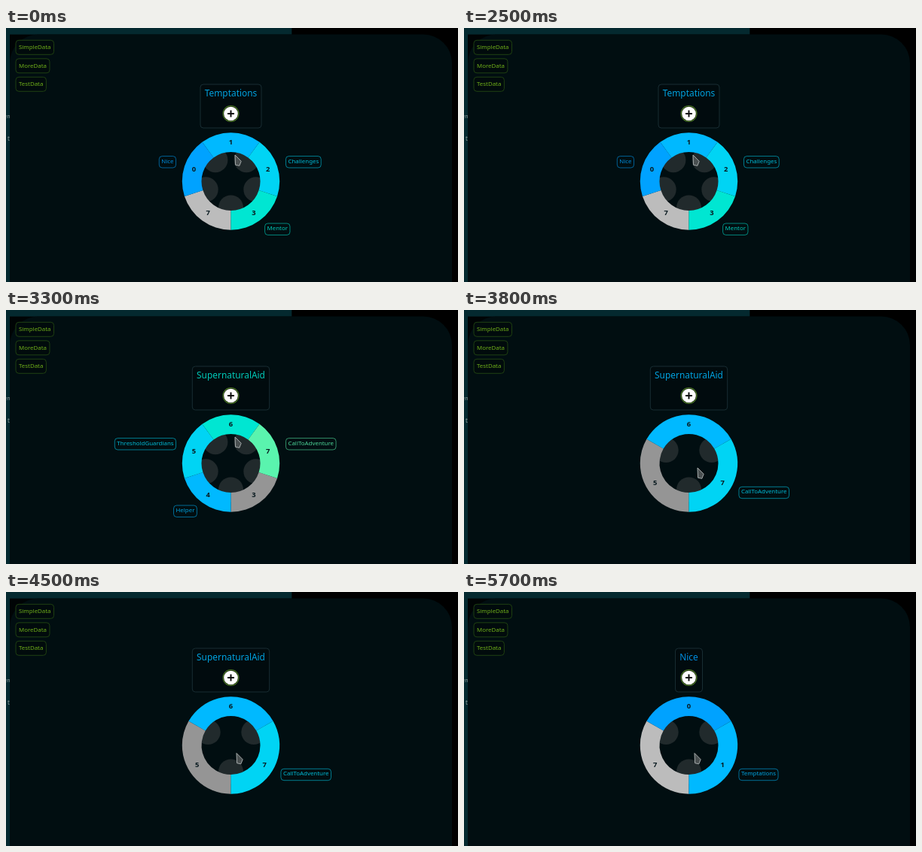
Animation, 600 px wide and 338 px high, one loop 5.8 s. Source, as an HTML page with a canvas:

```html
<!DOCTYPE html>
<html lang="en">
<head>
<meta charset="utf-8">
<title>Ring menu</title>
<style>
html, body { margin: 0; width: 100%; height: 100%; overflow: hidden; background: #000; }
canvas { display: block; }
</style>
</head>
<body>
<canvas id="stage" width="600" height="338"></canvas>
<script>
const ctx = document.getElementById('stage').getContext('2d');
const LOOP = 5800, CX = 298.5, CY = 204, OUTER = 64.7, INNER = 39;
const FONT = '"Noto Sans", "Open Sans", sans-serif';
const items = ['Nice', 'Temptations', 'Challenges', 'Mentor', 'Helper',
  'ThresholdGuardians', 'SupernaturalAid', 'CallToAdventure'];
const palette = ['#00a2ff', '#00b9ff', '#00d4f4', '#00e6d2', '#5af4ae', '#aefb86'];

// [start ms, selected item, slot count, cursor x, cursor y]
const timeline = [
  [0, 1, 5, 304, 169],
  [2800, 0, 5, 304, 169],
  [3000, 7, 5, 304, 169],
  [3200, 6, 5, 304, 169],
  [3800, 6, 3, 310, 210],
  [3900, 6, 4, 308.5, 213],
  [4000, 6, 6, 307, 215.5],
  [4200, 6, 5, 307, 215.5],
  [4300, 6, 4, 306.5, 215],
  [4400, 6, 3, 306, 214.5],
  [5400, 7, 3, 306, 214.5],
  [5600, 0, 3, 306, 214.5]
];

function text(str, x, y, size, color, align = 'center', weight = 500) {
  ctx.font = `${weight} ${size}px ${FONT}`;
  ctx.textAlign = align;
  ctx.fillStyle = color;
  ctx.fillText(str, x, y + size * 0.36);
}

function box(x, y, w, h, r, stroke, fill) {
  ctx.beginPath();
  ctx.roundRect(x, y, w, h, r);
  if (fill) { ctx.fillStyle = fill; ctx.fill(); }
  if (stroke) { ctx.strokeStyle = stroke; ctx.stroke(); }
}

function disc(x, y, r, fill) {
  ctx.beginPath();
  ctx.arc(x, y, r, 0, 2 * Math.PI);
  ctx.fillStyle = fill;
  ctx.fill();
}

function width(str, size) {
  ctx.font = `500 ${size}px ${FONT}`;
  return ctx.measureText(str).width;
}

function backdrop() {
  ctx.fillStyle = '#000';
  ctx.fillRect(0, 0, 600, 338);
  ctx.fillStyle = '#04292f';
  ctx.fillRect(0, 0, 379.3, 338);
  text('en', 5.5, 117, 7, '#8c9c9c', 'right');
  text('t', 5, 147, 8, '#8c9c9c', 'right');
  ctx.fillStyle = '#000405';
  ctx.fillRect(5, 8.6, 375, 330);
  box(5, 8.6, 587, 400, 38, null, '#010e11');
  ['SimpleData', 'MoreData', 'TestData'].forEach((name, i) => {
    const y = 16.3 + i * 24.5;
    box(13, y, width(name, 7.9) + 8, 19, 4, '#1f4012', '#010b0c');
    text(name, 17, y + 9.2, 7.9, '#70b01a', 'left');
  });
}

function header(name, color) {
  const w = width(name, 11.9) + 11.5;
  box(CX - w / 2, 75, w, 58, 4, '#182d33', '#010b0e');
  ctx.globalAlpha = 0.87;
  text(name, CX, 86.7, 11.9, color);
  ctx.globalAlpha = 1;
  disc(CX, 114, 11, '#4d7a26');
  disc(CX, 114, 10, '#18240f');
  disc(CX, 114, 9.3, '#fff');
  ctx.fillStyle = '#101010';
  ctx.fillRect(CX - 4.5, 113, 9, 2);
  ctx.fillRect(CX - 1, 109.5, 2, 9);
}

function label(name, angle, color) {
  const c = Math.cos(angle), w = width(name, 7.9) + 6;
  const side = Math.abs(c) < 0.01 ? 0 : Math.sign(c);
  const x = CX + 76.7 * c + (side - 1) * w / 2;
  const y = 203 + 80 * Math.sin(angle);
  ctx.globalAlpha = 0.55;
  box(x, y - 7.7, w, 15.4, 4, color);
  ctx.globalAlpha = 0.87;
  text(name, x + w / 2, y - 1.5, 7.9, color);
  ctx.globalAlpha = 1;
}

function ring(top, n) {
  const step = 2 * Math.PI / n;
  const start = Math.max(-1, Math.min(top - Math.floor(n / 2), items.length - n));
  for (let i = 0; i < n; i++) {
    const a = -Math.PI / 2 + (i + 0.5) * step;
    disc(CX + 35 * Math.cos(a), CY + 35 * Math.sin(a), 16.5, '#212a2c');
  }
  for (let i = 0; i < n; i++) {
    const index = start + i, item = (index + items.length) % items.length;
    const angle = (index - top) * step - Math.PI / 2;
    const gray = start < 0 ? '#bcbcbc' : '#959595';
    const color = i ? palette[index - Math.max(start, 0)] : gray;
    ctx.beginPath();
    ctx.arc(CX, CY, OUTER, angle - step / 2, angle + step / 2);
    ctx.arc(CX, CY, INNER, angle + step / 2, angle - step / 2, true);
    ctx.fillStyle = color;
    ctx.fill();
    text(item, CX + 51.7 * Math.cos(angle), CY - 0.4 + 51.7 * Math.sin(angle),
      9.4, '#08191f', 'center', 700);
    if (index === top) header(items[item], color);
    else if (i) label(items[item], angle, color);
  }
}

function cursor(x, y) {
  ctx.beginPath();
  ctx.moveTo(x, y);
  ctx.lineTo(x + 8.2, y + 8.3);
  ctx.lineTo(x + 5.8, y + 14.3);
  ctx.lineTo(x + 0.6, y + 13.2);
  ctx.closePath();
  ctx.fillStyle = '#4a5051';
  ctx.fill();
  ctx.strokeStyle = '#a5abab';
  ctx.stroke();
}

function draw(now) {
  const t = now % LOOP;
  const [, top, n, x, y] = timeline.findLast(s => s[0] <= t) || timeline[0];
  backdrop();
  ring(top, n);
  cursor(x, y);
  requestAnimationFrame(draw);
}
draw(0);
</script>
</body>
</html>
```
